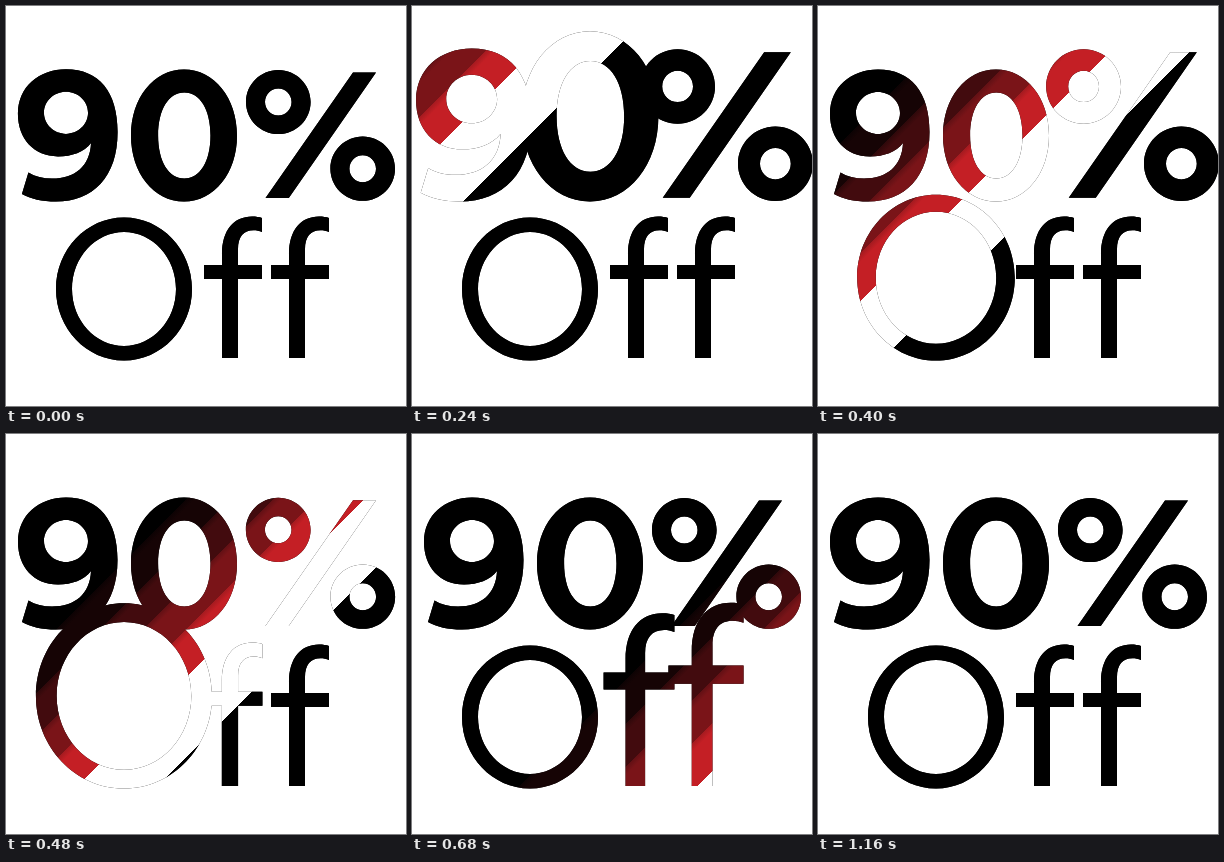
These frames come from a looping animation (400x400 px, 1.2 s). An HTML page with a canvas:

```html
<!DOCTYPE html>
<html lang="en">
<head>
<meta charset="utf-8">
<title>90% Off</title>
<style>
  html, body { margin: 0; width: 100%; height: 100%; overflow: hidden; background: #fff; }
  canvas { display: block; width: 100vw; height: 100vh; }
</style>
</head>
<body>
<canvas id="stage" width="400" height="400" role="img" aria-label="90% Off"></canvas>
<script>
const ctx = document.getElementById('stage').getContext('2d');
const STEP = 40, STEPS = 30;

// Closed oval; k sets how square its shoulders are (0.552 = ellipse).
function oval(x, y, rx, ry, k = 0.552) {
  const a = rx * k, b = ry * k;
  return `M${x - rx} ${y}C${x - rx} ${y - b} ${x - a} ${y - ry} ${x} ${y - ry}` +
    `C${x + a} ${y - ry} ${x + rx} ${y - b} ${x + rx} ${y}` +
    `C${x + rx} ${y + b} ${x + a} ${y + ry} ${x} ${y + ry}` +
    `C${x - a} ${y + ry} ${x - rx} ${y + b} ${x - rx} ${y}Z`;
}

const ring = (x, y) => oval(x, y, 32.3, 32.1) + oval(x, y, 13.3, 13.5);

const nine = 'M85 137C78 146 66 150.5 52 150.5C28 150.5 12 133 12 108C12 81 33 63.5 60 63.5' +
  'C93 63.5 111.5 86 111.5 126C111.5 171 87 195.5 50 195.5C36 195.5 25 193 16 188L22.5 166.5' +
  'C29 170.5 37 172.5 46 172.5C69 172.5 84 160 85 137Z' + oval(60, 107, 22, 21);

const zero = oval(178, 129.5, 53, 66, 0.57) + oval(178.3, 129.5, 26.2, 43, 0.6);

const percent = ring(272.3, 96) + 'M347 66.5H370L282.800 192H259.5Z' + ring(356.7, 162.7);

const bigO = oval(118, 283, 68, 71.5) + oval(118, 283, 52, 57);

const f = 'M216 352V273H198V259H216V248C216 224 228 210.5 246 210.5C250 210.5 253.500 211 256 212' +
  'V226C253.500 224.800 250.500 224.300 247.500 224.300C237.500 224.300 232 231 232 243V259H256V273H232V352Z';

// Each glyph swells about the middle of its baseline; peak is in steps.
const glyph = (d, cx, base, peak, dx = 0) => {
  const path = new Path2D();
  path.addPath(new Path2D(d), new DOMMatrix([1, 0, 0, 1, dx, 0]));
  return { path, cx, base, peak };
};

const glyphs = [
  glyph(nine, 62, 195.5, 4),
  glyph(zero, 178, 195.5, 5.65),
  glyph(percent, 314.5, 194, 8),
  glyph(bigO, 118, 354.5, 12),
  glyph(f, 227, 352, 15.6),
  glyph(f, 294, 352, 17, 67)
];

function swell(n, peak) {
  const d = Math.min(1, Math.abs(n - peak) / 4.2);
  return 1 + 0.295 * (1 + Math.cos(Math.PI * d)) / 2;
}

const SHADES = [[0, 0, 0], [22, 4, 5], [66, 11, 14], [122, 20, 24], [196, 31, 37]];
const rgb = c => `rgb(${c.map(Math.round).join()})`;
const mix = (a, b, t) => a.map((v, i) => v + (b[i] - v) * t);

// Diagonal bands, placed by x + y, running towards the lower right.
function bands(n) {
  const g = ctx.createLinearGradient(0, 0, 400, 400);
  const stop = (s, c) => g.addColorStop(Math.min(1, Math.max(0, s / 800)), rgb(c));
  const front = 42.8 * n - 10.5, white = front - 80, red = white - 48;
  const edges = [red - 130, red - 86, red - 43, red];

  stop(0, SHADES[0]);
  edges.forEach((e, i) => {
    const dark = SHADES[i], light = SHADES[i + 1];
    stop(e, dark);
    stop(e, mix(dark, light, 0.55));
    stop(e + 9, light);
  });
  stop(white, SHADES[4]);
  stop(white, [255, 255, 255]);
  stop(front, [255, 255, 255]);
  stop(front, SHADES[0]);
  stop(800, SHADES[0]);
  return g;
}

function pose({ path, cx, base, peak }, n) {
  const k = swell(n, peak), shape = new Path2D();
  shape.addPath(path, new DOMMatrix([k, 0, 0, k, cx * (1 - k), base * (1 - k)]));
  return shape;
}

function draw(n) {
  ctx.fillStyle = '#fff';
  ctx.fillRect(0, 0, 400, 400);
  const shapes = glyphs.map(g => pose(g, n));
  // The black underlay leaves a hairline around the white band.
  for (const style of ['#000', bands(n)]) {
    ctx.fillStyle = style;
    shapes.forEach(s => ctx.fill(s, 'evenodd'));
  }
}

const start = performance.now();
function tick() {
  draw(Math.floor((performance.now() - start) / STEP) % STEPS);
  requestAnimationFrame(tick);
}
tick();
</script>
</body>
</html>
```
